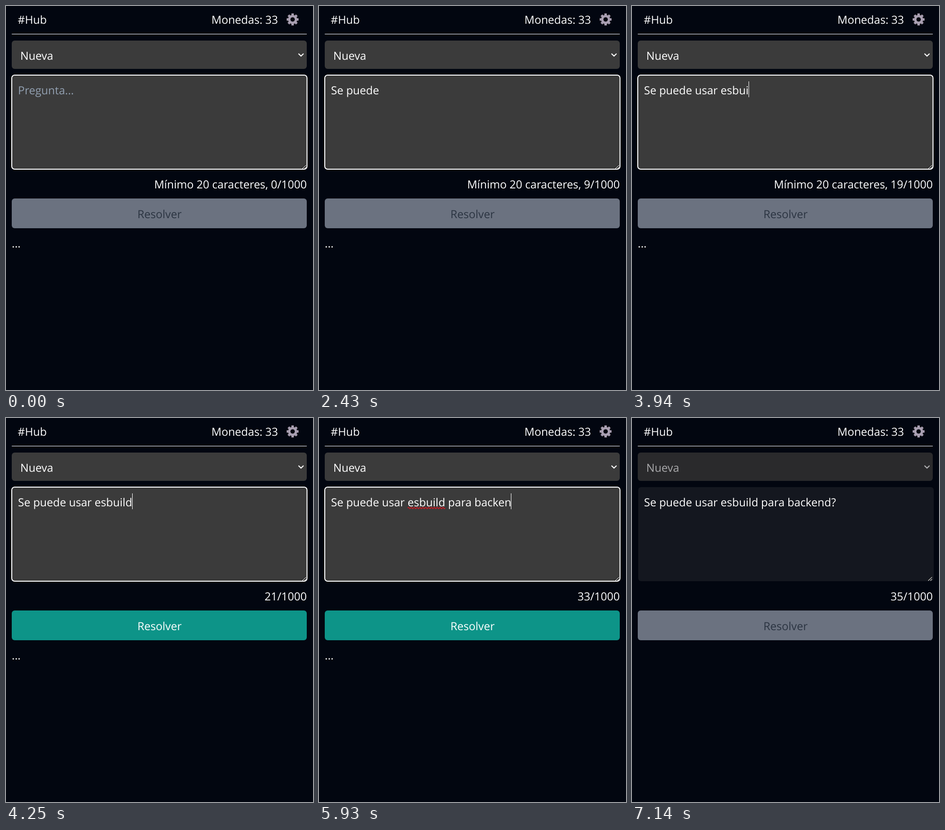
An HTML page for the animation above (8000 ms loop, 640 by 800 pixels).

```html
<!DOCTYPE html>
<html lang="es">
<head>
<meta charset="utf-8">
<title>Hub</title>
<style>
html, body { margin: 0; width: 100%; height: 100%; overflow: hidden; background: #020610; }
svg { display: block; width: 100%; height: 100%; }
text {
  font: 23.15px "Open Sans", "Noto Sans", sans-serif;
  fill: #fff;
  white-space: pre;
  text-rendering: geometricPrecision;
}
.line { fill: none; stroke: #fff; stroke-width: 2; }
</style>
</head>
<body>
<svg viewBox="0 0 640 800">
  <rect width="640" height="800" fill="#020610"/>

  <text x="24.5" y="37">#Hub</text>
  <text x="428.3" y="37">Monedas: 33</text>
  <g id="gear" fill="none" stroke="#a99fb1" stroke-width="5">
    <circle cx="597.5" cy="28" r="7.1"/>
  </g>
  <rect x="12" y="58" width="615" height="1" fill="#fff"/>

  <rect id="select" x="12" y="72" width="615" height="59" rx="6"/>
  <text id="option" x="29.8" y="112">Nueva</text>
  <path id="chevron" class="line" d="M609.7 99.2l5.3 5.1 5.3-5.1"/>

  <rect id="area" y="144" height="196" rx="6"/>
  <rect id="areaRing" class="line" x="12" y="144" width="615.5" height="196" rx="6"/>
  <text id="hint" x="25" y="184" style="fill:#92a0b1">Pregunta...</text>
  <path id="squiggle" fill="none" stroke="#e8121c" stroke-width="1.5"/>
  <text id="typed" x="25" y="184"></text>
  <rect id="caret" y="157" width="1" height="33" fill="#fff"/>
  <path d="M616.5 338.5l8.5-8M620.5 338.5l4.5-4.2" stroke="#111" stroke-width="1.6"/>
  <path d="M617.5 339l8-7.6M622 339l3.5-3.4" stroke="#d0d0d0" stroke-width="1.3"/>

  <text id="counter" x="627" y="380" text-anchor="end"></text>
  <rect id="button" x="12" y="401" width="615" height="62" rx="6"/>
  <rect id="buttonRing" class="line" x="12" y="401" width="615.5" height="62" rx="6"/>
  <text id="label" x="320" y="442" text-anchor="middle">Resolver</text>
  <text id="answer" x="12" y="503">...</text>
</svg>
<script>
const LOOP = 8000, SEND = 6770, BUSY = 7140, MIN = 20;
const QUESTION = "Se puede usar esbuild para backend?";

// Moment of each key press, in ms
const KEYS = [
  540, 850, 1030, 1280, 1530, 1620, 1710, 1790, 1880,
  2490, 2570, 2660, 2840, 2900,
  3150, 3410, 3590, 3700, 3940, 4120, 4220, 4320,
  4600, 4690, 4780, 4870, 4960,
  5270, 5450, 5550, 5650, 5750, 5930, 5990, 6400
];

const $ = id => document.getElementById(id);
const show = (id, on) => $(id).setAttribute("visibility", on ? "visible" : "hidden");
const fill = (id, color) => { $(id).style.fill = color; };

function drawGear() {
  let d = "";
  for (let i = 0; i < 8; i++) {
    const a = i * Math.PI / 4, x = Math.cos(a), y = Math.sin(a);
    d += `M${597.5 + 8 * x} ${28 + 8 * y}L${597.5 + 12.4 * x} ${28 + 12.4 * y}`;
  }
  const teeth = document.createElementNS($("gear").namespaceURI, "path");
  teeth.setAttribute("d", d);
  $("gear").append(teeth);
}

function render(t) {
  const count = KEYS.filter(k => k <= t).length;
  const ready = count >= MIN, busy = t >= BUSY, focused = t < SEND;

  $("typed").textContent = QUESTION.slice(0, count);
  $("counter").textContent = (ready ? "" : `Mínimo ${MIN} caracteres, `) + count + "/1000";
  show("hint", !count);

  const end = count ? $("typed").getComputedTextLength() : 0;
  $("caret").setAttribute("x", Math.floor(25 + end));
  show("caret", focused && t >= 480 && !(t >= 2430 && t < 2490));
  show("squiggle", t >= 4420 && !busy);

  show("areaRing", focused);
  show("buttonRing", !focused && !busy);
  show("answer", !busy);

  $("area").setAttribute("x", busy ? 13 : 12);
  $("area").setAttribute("width", busy ? 616 : 615);
  fill("area", busy ? "#14171f" : "#3b3b3b");
  fill("select", busy ? "#2a2a2c" : "#3b3b3b");
  fill("option", busy ? "#a9a9ab" : "#fff");
  $("chevron").style.stroke = busy ? "#b4b4b6" : "#fff";

  const active = ready && !busy;
  fill("button", active ? "#0d9488" : "#6b7280");
  fill("label", active ? "#fff" : "#2b3441");
}

drawGear();
$("squiggle").setAttribute("d", "M185 187.5q1.5-3 3 0" + "t3 0".repeat(25));

const start = performance.now();
function tick() {
  render((performance.now() - start) % LOOP);
  requestAnimationFrame(tick);
}
tick();
</script>
</body>
</html>
```
